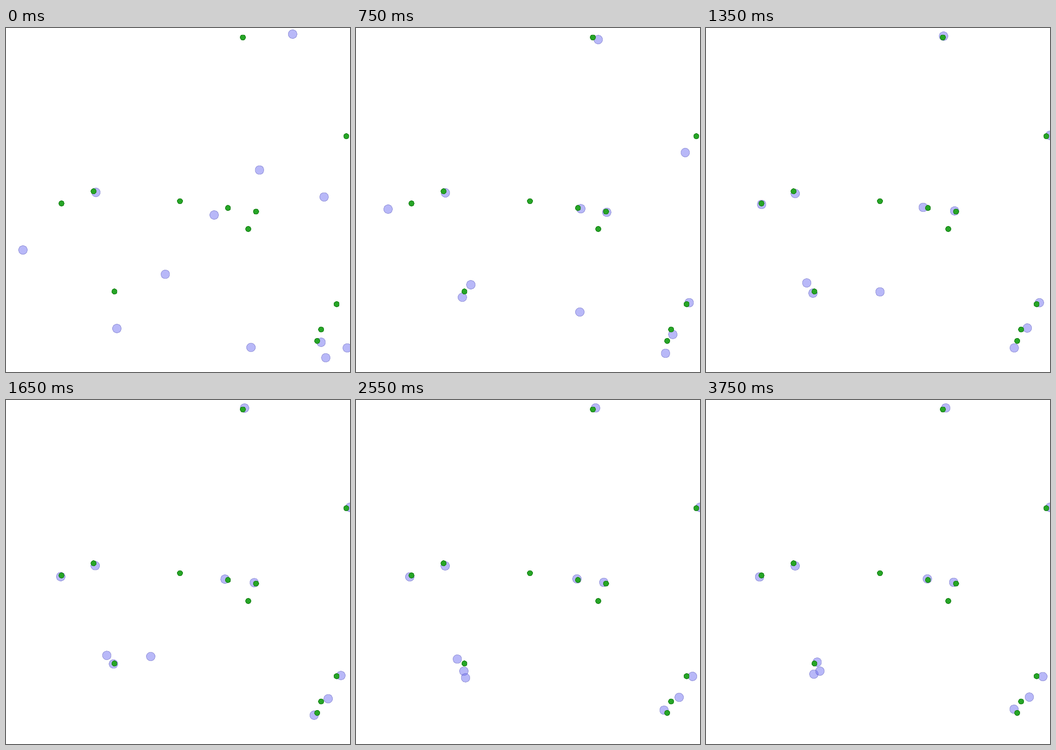
A matplotlib script that plays this animation: 700 by 700 pixels, repeating every 3900 ms.

```python
import numpy as np
import matplotlib.pyplot as plt
from matplotlib.animation import FuncAnimation
from matplotlib.patches import Circle

SIZE, DPI = 700, 100
FRAMES, STEP = 26, 150
SCALE = SIZE / 2
AGENT_R, GOAL_R = 0.025 * SCALE, 0.015 * SCALE
AGENT = (0.45, 0.45, 0.95)
GOAL = (0.15, 0.65, 0.15)
DRAG = 0.75

GOALS = [(482, 19.3), (692.5, 220.2), (178.2, 332.2), (112.8, 357),
         (354, 352.4), (451.7, 366.2), (508.8, 373.6), (493, 409),
         (220.7, 536.2), (672.7, 562), (641.2, 613.5), (633.2, 636.8)]


def harmonic(a, b):
    same = a * b > 0
    return np.where(same, 2 * a * b / np.where(same, a + b, 1), 0)


def travel(stops, rest=None):
    """Glide from standstill through {step: point}, then let drag settle at rest."""
    keys = np.array(list(stops))
    points = np.array(list(stops.values()), float)
    rest = points[-1] if rest is None else np.array(rest, float)
    gaps = np.diff(keys)[:, None]
    slopes = np.diff(points, axis=0) / gaps
    pull = (1 - DRAG) * (rest - points[-1])
    slopes = np.vstack([slopes, pull])
    speed = np.vstack([[0, 0], harmonic(slopes[:-1], slopes[1:])])

    t = np.arange(FRAMES)
    k = np.clip(np.searchsorted(keys, t, side="right") - 1, 0, len(gaps) - 1)
    u = np.minimum((t - keys[k])[:, None] / gaps[k], 1)
    ease = u * u * (3 - 2 * u)
    path = (points[k] * (1 - ease) + points[k + 1] * ease
            + gaps[k] * u * (1 - u) * (speed[k] * (1 - u) - speed[k + 1] * u))
    late = np.maximum(t - keys[-1], 0)[:, None]
    return path + (rest - points[-1]) * (1 - DRAG ** late)


def disc(center, radius, color, alpha, z):
    edge = tuple(c / 2 for c in color)
    fill = Circle(center, radius, fc=color + (alpha,), ec="none",
                  antialiased=False, zorder=z)
    ring = Circle(center, radius, fc="none", ec=edge + (alpha / 2,),
                  lw=72 / DPI, zorder=z)
    ax.add_patch(fill)
    ax.add_patch(ring)
    return fill, ring


fig = plt.figure(figsize=(SIZE / DPI, SIZE / DPI), dpi=DPI, facecolor="white")
ax = fig.add_axes([0, 0, 1, 1])
ax.set_xlim(0, SIZE)
ax.set_ylim(SIZE, 0)
ax.axis("off")

paths = [
    # agents that head for a goal and stay there
    travel({0: (183, 334.5), 5: (182, 335.5)}, (181.5, 337.6)),
    travel({0: (34.5, 451.7), 5: (65.3, 368.6), 9: (113.2, 359)}, (109, 360)),
    travel({0: (583.3, 12.5), 5: (492.9, 23.6), 9: (483.4, 16.6)}, (488, 16.2)),
    travel({0: (515.8, 289), 5: (510.3, 375)}, (504, 371)),
    travel({0: (423.6, 380.5), 5: (457.5, 367.7), 9: (442, 365)}, (450.5, 364)),
    travel({0: (647.3, 343.8), 5: (670, 253.5), 9: (699.8, 218.5)}),
    travel({0: (694.3, 651), 5: (678, 559), 9: (678.4, 559)}, (685.5, 562.8)),
    travel({0: (641.2, 639.5), 5: (644.7, 623.6)}, (658, 604.5)),
    travel({0: (650.7, 671), 5: (629.8, 662), 9: (627.3, 651)}, (626.8, 629)),
    # three that crowd around the same goal
    travel({0: (324.2, 501.2), 5: (233.7, 522.5), 9: (205, 518.7),
            17: (206.2, 527.2), 25: (226.2, 533.5)}),
    travel({0: (225.6, 611.5), 5: (216.4, 548), 13: (219.2, 536.3),
            17: (219.5, 551.8), 25: (219.5, 557.8)}),
    travel({0: (498.5, 650), 5: (455.5, 578), 13: (254.4, 516),
            17: (222.9, 565.3), 21: (235.5, 595), 25: (231.8, 551.7)}),
]

agents = [disc(path[0], AGENT_R, AGENT, 0.5, 1) for path in paths]
for goal in GOALS:
    disc(goal, GOAL_R, GOAL, 1, 2)


def update(frame):
    for pair, path in zip(agents, paths):
        for patch in pair:
            patch.center = path[frame]
    return [patch for pair in agents for patch in pair]


anim = FuncAnimation(fig, update, frames=FRAMES, interval=STEP,
                     repeat=True, repeat_delay=0, blit=False)
plt.show()
```
